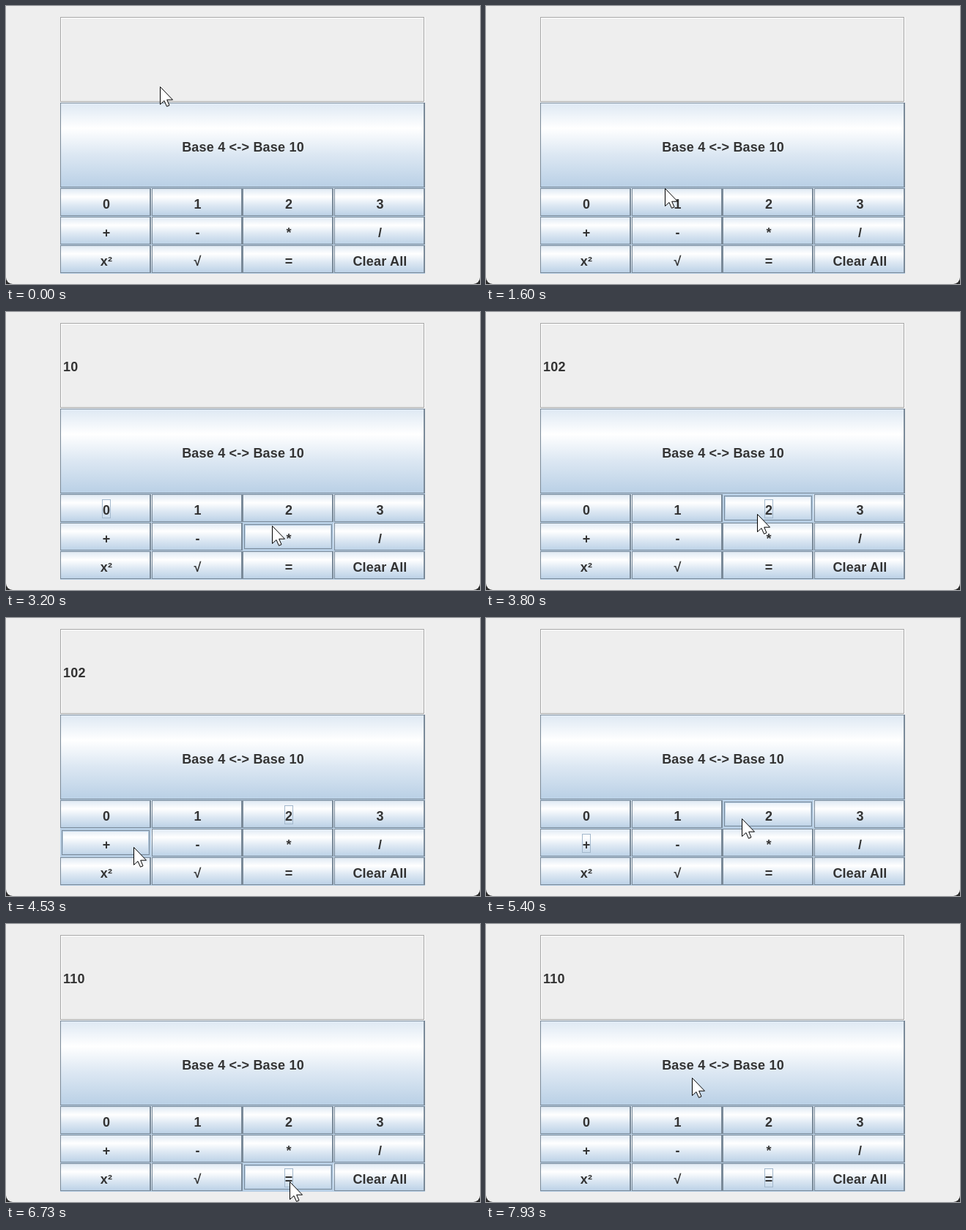
An HTML page that plays this animation: 647x380 px, repeating every 8000 ms.

```html
<!DOCTYPE html>
<html lang="en">
<head>
<meta charset="utf-8">
<title>Base 4 calculator</title>
<style>
  html, body { margin: 0; width: 100%; height: 100%; overflow: hidden; background: #2b2b2b; }
  #window {
    --line: #7a8a99; --glow: #b8cfe5;
    position: absolute; width: 647px; height: 380px; overflow: hidden;
    background: #eee; border-radius: 0 0 9px 9px;
    font: bold 18px/20px "Liberation Sans", Arial, sans-serif;
    letter-spacing: .2px; color: #333; white-space: pre; cursor: default;
  }
  #display, .key, .key::before, #pointer { position: absolute; box-sizing: border-box; }
  #display {
    left: 74px; top: 15px; width: 498px; height: 117px; padding: 50px 0 0 4px;
    box-shadow: inset -1px -1px #fff, inset 1px 1px #a6a6a6,
                inset -2px -2px #a6a6a6, inset 2px 2px #fff;
  }
  .key {
    display: flex; justify-content: center; align-items: center;
    background: linear-gradient(#dde8f3, #fff 30%, #dde8f3 60%, var(--glow));
  }
  .key::before {
    content: ""; inset: 0 var(--gap) 1px 0;
    box-shadow: inset 1px 1px var(--line), inset -2px -1px var(--line);
  }
  .key span { position: relative; padding-top: 4px; }
  .key.hover::before {
    box-shadow: inset 0 0 0 2px var(--glow), inset 0 0 0 3px var(--line),
                inset 0 0 0 4px var(--glow);
  }
  .key.pressed { background: var(--glow); }
  .key.pressed::before {
    inset: 0; box-shadow: inset 2px 2px var(--line), inset -2px -1px var(--line);
  }
  .key.focus:not(.pressed) span::after {
    content: ""; position: absolute; inset: -1px; border: 1px solid #a3b8cc;
  }
  #pointer { left: 0; top: 0; overflow: visible; }
</style>
</head>
<body>
<div id="window">
  <div id="display"></div>
  <svg id="pointer" width="19" height="28">
    <path d="M.5 .5V24.5L6 19.5L9.5 27.3L13 25.8L9.7 18.2H17.5Z" fill="#fff" stroke="#000"/>
  </svg>
</div>
<script>
const LOOP = 8000, STEP = 1000 / 15;
const LEFT = 74.25, TOP = 249, COLUMN = 124.5, ROW = 39;
const stage = document.getElementById('window');
const display = document.getElementById('display');
const pointer = document.getElementById('pointer');

const home = { x: 210, y: 110 };
const moves = [
  { from: 1, to: 4, x: 221, y: 129 },
  { from: 7, to: 14, x: 172, y: 188 },
  { from: 14, to: 20, x: 222, y: 246 },
  { from: 20, to: 24, x: 244, y: 249 },
  { from: 24, to: 27, x: 258, y: 256, click: '1', at: 30 },
  { from: 33, to: 37, x: 150, y: 272, click: '0', at: 39 },
  { from: 40, to: 48, x: 363, y: 292 },
  { from: 48, to: 52, x: 370, y: 276, click: '2', at: 53 },
  { from: 59, to: 68, x: 174, y: 313, click: '+', at: 70 },
  { from: 74, to: 81, x: 349, y: 274 },
  { from: 81, to: 83, x: 364, y: 272, click: '2', at: 84 },
  { from: 89, to: 95, x: 387, y: 352, click: '=', at: 100 },
  { from: 113, to: 119, x: 281, y: 210 }
];

// Edges are rounded to whole pixels, so columns alternate in width.
function addKey(label, column, y, span, h) {
  const x = Math.round(LEFT + column * COLUMN);
  const w = Math.round(LEFT + (column + span) * COLUMN) - x;
  const el = document.createElement('div');
  const text = document.createElement('span');
  text.textContent = label;
  el.className = 'key';
  el.style.cssText =
    `left:${x}px;top:${y}px;width:${w}px;height:${h}px;--gap:${w % 2}px;padding-left:1px`;
  el.append(text);
  stage.insertBefore(el, pointer);
  return { label, el, x, y, w, h };
}

addKey('Base 4 <-> Base 10', 0, TOP - 3 * ROW, 4, 3 * ROW);
const keys = ['0', '1', '2', '3', '+', '-', '*', '/', 'x²', '√', '=', 'Clear All']
  .map((label, i) => addKey(label, i % 4, TOP + ROW * Math.floor(i / 4), 1, ROW));

function pointerAt(step) {
  let { x, y } = home;
  for (const m of moves) {
    const u = Math.min(1, Math.max(0, (step - m.from) / (m.to - m.from)));
    const ease = u * u * (3 - 2 * u);
    x += (m.x - x) * ease;
    y += (m.y - y) * ease;
  }
  return [Math.round(x), Math.round(y)];
}

// Replays the clicks made so far; a key acts one step after it goes down.
function calculatorAt(step) {
  let shown = '', stored = '', focus, pressed;
  for (const { click, at } of moves) {
    if (!click || step < at) continue;
    focus = click;
    if (step < at + 1) pressed = click;
    else if (click === '+') [stored, shown] = [shown, ''];
    else if (click === '=') shown = (parseInt(stored, 4) + parseInt(shown, 4)).toString(4);
    else shown += click;
  }
  return { shown, focus, pressed };
}

function render(step) {
  const [x, y] = pointerAt(step);
  const { shown, focus, pressed } = calculatorAt(step);
  pointer.style.transform = `translate(${x}px,${y}px)`;
  display.textContent = shown;
  for (const k of keys) {
    const inside = x > k.x && x < k.x + k.w && y > k.y && y < k.y + k.h;
    k.el.classList.toggle('hover', inside);
    k.el.classList.toggle('focus', k.label === focus);
    k.el.classList.toggle('pressed', k.label === pressed);
  }
}

const start = performance.now();
function tick() {
  const time = (performance.now() - start) % LOOP;
  render(Math.floor(time / STEP + 0.06));
  requestAnimationFrame(tick);
}
render(0);
requestAnimationFrame(tick);
</script>
</body>
</html>
```
